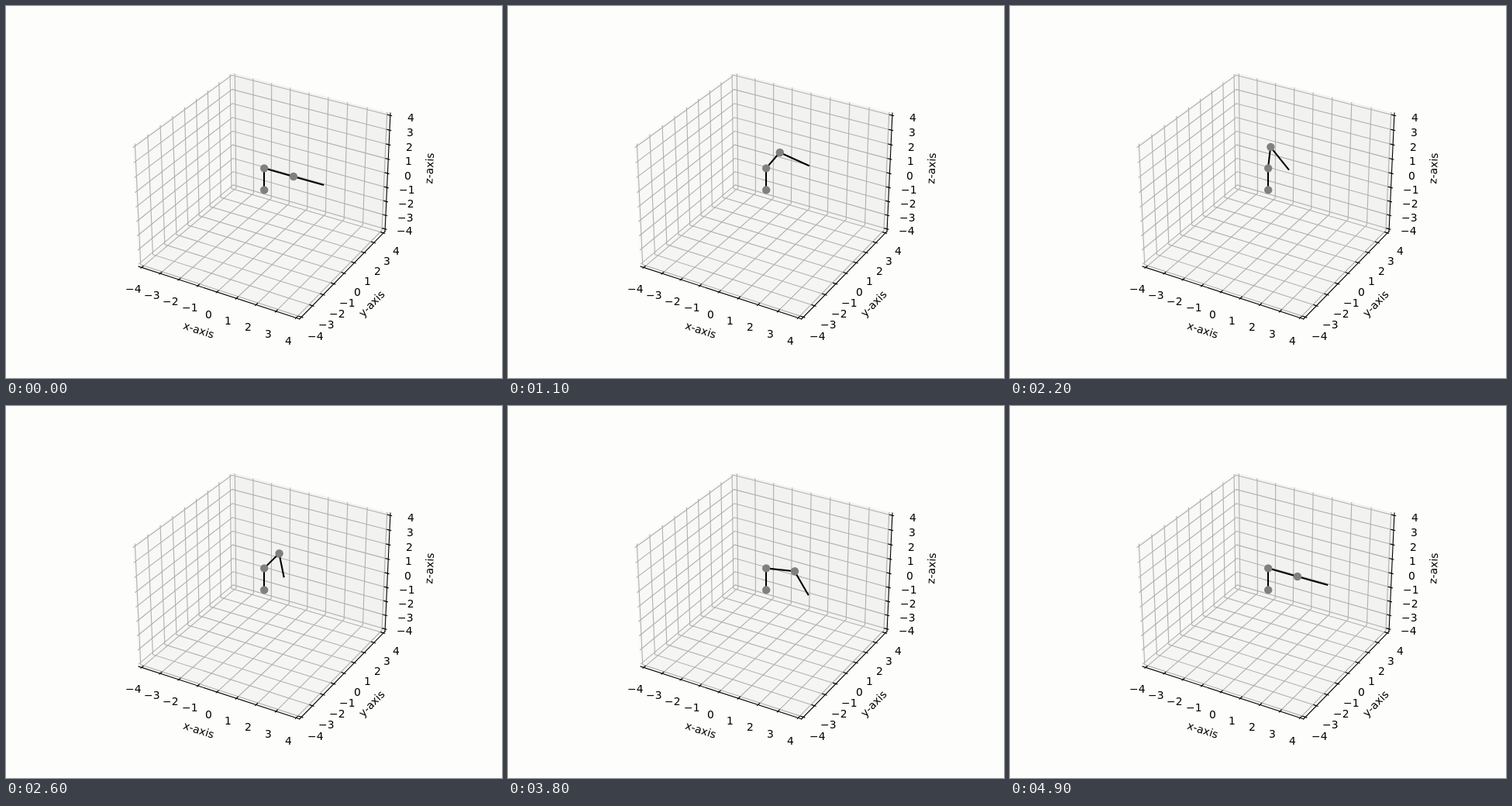
An HTML page that plays this animation: 640x480 px, repeating every 5 s.

```html
<!DOCTYPE html>
<html lang="en">
<head>
<meta charset="utf-8">
<title>Two-link arm tracing a circle</title>
<style>
  html, body { margin: 0; width: 100%; height: 100%; overflow: hidden; background: #fdfefb; }
  svg { display: block; width: 640px; height: 480px; }
  text { font: 13.889px "DejaVu Sans", sans-serif; }
  .name { text-anchor: middle; }
  .grid { stroke: #b0b0b0; stroke-width: 1.11; fill: none; }
  .axis { stroke: #000; stroke-width: 1.11; stroke-linecap: square; fill: none; }
  .arm { stroke: #000; stroke-width: 2.08; stroke-linecap: square; stroke-linejoin: round; fill: none; }
  .joint { fill: #808080; }
</style>
</head>
<body>
<svg id="stage" viewBox="0 0 640 480"></svg>
<script>
const stage = document.getElementById('stage');
const SIDE = 4 + 1 / 6;          // walls lie a little beyond the last ticks
const TICK_PAD = SIDE + 0.6916;
const LABEL_PAD = SIDE + 1.503;
const LINK = 1.5;
const FRAMES = 50, STEP = 100;
const TICKS = [-4, -3, -2, -1, 0, 1, 2, 3, 4];

function add(tag, attrs, text) {
  const el = document.createElementNS('http://www.w3.org/2000/svg', tag);
  for (const key in attrs) el.setAttribute(key, attrs[key]);
  if (text) el.textContent = text;
  return stage.appendChild(el);
}

// Perspective camera at elevation 30, azimuth -60, distance 10.
function project([x, y, z]) {
  x *= 0.142857; y *= 0.142857; z *= 0.107143;
  const right = 0.866025 * x + 0.5 * y;
  const up = -0.25 * x + 0.433013 * y + 0.866025 * z;
  const depth = 10 - (0.433013 * x - 0.75 * y + 0.5 * z);
  return [333 + 1997.8 * right / depth, 237.4 - 1997.8 * up / depth];
}

const points = list => list.map(p => project(p).map(n => n.toFixed(2)).join()).join(' ');
const line = (cls, ...list) => add('polyline', { class: cls, points: points(list) });
const wall = (fill, ...list) => add('polygon', { fill, points: points(list) });

// Tick text starts on a whole pixel.
function tickLabel(value, pos) {
  const [x, y] = project(pos);
  const el = add('text', { y: Math.round(y + 11) }, String(value).replace('-', '\u2212'));
  el.setAttribute('x', Math.round(x - el.getComputedTextLength() / 2));
}

function axisLabel(name, pos, from, to) {
  const [x, y] = project(pos), a = project(from), b = project(to);
  const angle = Math.atan2(b[1] - a[1], b[0] - a[0]) * 180 / Math.PI;
  add('text', {
    class: 'name', y: 3.8,
    transform: `translate(${(x - 1.2).toFixed(2)} ${(y + 1).toFixed(2)}) rotate(${angle.toFixed(2)})`
  }, name);
}

function drawBox() {
  const s = SIDE, inner = s - 0.1333, outer = s + 0.0667;
  const left = [-s, -s, -s], front = [s, -s, -s], right = [s, s, -s], top = [s, s, s];
  const back = [-s, s, -s], backTop = [-s, s, s];

  wall('#f8f8f6', left, back, backTop, [-s, -s, s]);
  wall('#f2f2f1', back, right, top, backTop);
  wall('#f5f6f4', left, front, right, back);

  for (const t of TICKS) {
    line('grid', [t, -s, -s], [t, s, -s], [t, s, s]);
    line('grid', [s, t, -s], [-s, t, -s], [-s, t, s]);
    line('grid', [-s, -s, t], [-s, s, t], [s, s, t]);
  }

  line('axis', left, front);
  line('axis', front, right);
  line('axis', right, top);

  for (const t of TICKS) {
    line('axis', [t, -inner, -s], [t, -outer, -s]);
    line('axis', [inner, t, -s], [outer, t, -s]);
    line('axis', [inner, s, t], [outer, s, t]);
    tickLabel(t, [t, -TICK_PAD, -TICK_PAD]);
    tickLabel(t, [TICK_PAD, t, -TICK_PAD]);
    tickLabel(t, [TICK_PAD, TICK_PAD, t]);
  }

  const d = LABEL_PAD;
  axisLabel('x-axis', [0, -d, -d], left, front);
  axisLabel('y-axis', [d, 0, -d], front, right);
  axisLabel('z-axis', [d, d, 0], right, top);
}

drawBox();
const arm = add('polyline', { class: 'arm' });
const joints = [0, 1, 2].map(() => add('circle', { class: 'joint', r: 5.2 }));

// The tip follows a unit circle; the elbow stays above the shoulder-tip line.
function pose(time) {
  const frame = Math.floor(time / STEP) % FRAMES;
  const phase = 2 * Math.PI * frame / (FRAMES - 1);
  const x = 2 + Math.cos(phase), z = Math.sin(phase);
  const bend = Math.acos(Math.min(1, Math.hypot(x, z) / (2 * LINK)));
  const lift = Math.atan2(z, x) + bend;
  const base = [0, 0, 0], shoulder = [0, 0, LINK];
  const elbow = [LINK * Math.cos(lift), 0, LINK + LINK * Math.sin(lift)];
  return [base, shoulder, elbow, [x, 0, LINK + z]];
}

function draw(time) {
  const chain = pose(time);
  arm.setAttribute('points', points(chain));
  joints.forEach((dot, i) => {
    const [x, y] = project(chain[i]);
    dot.setAttribute('cx', (x + 0.2).toFixed(2));
    dot.setAttribute('cy', y.toFixed(2));
  });
}

let start;
function tick(now) {
  if (start === undefined) start = now;
  draw(Math.max(0, now - start));
  requestAnimationFrame(tick);
}
draw(0);
requestAnimationFrame(tick);
</script>
</body>
</html>
```
